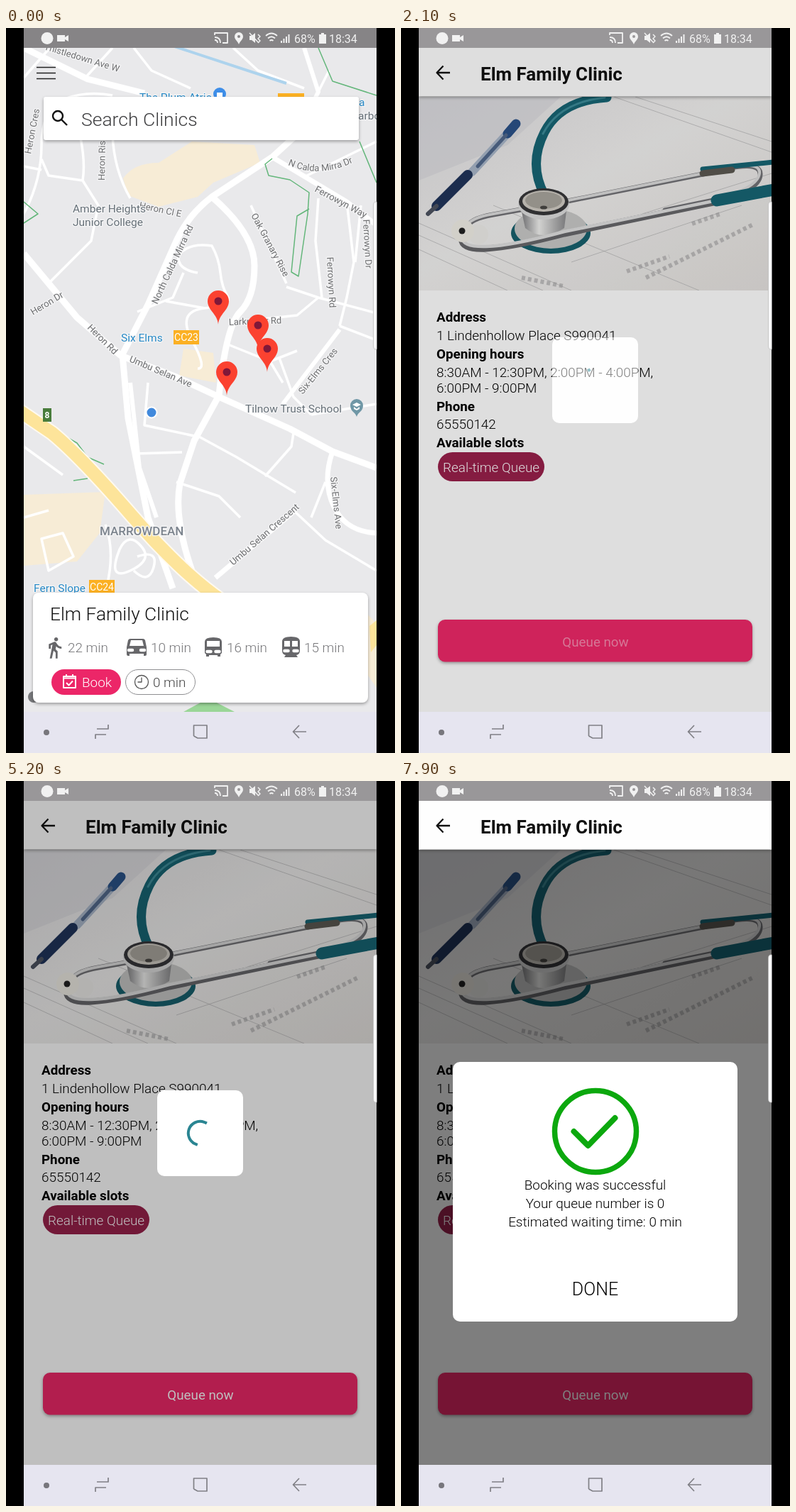
Recreate the animation shown at these times as an HTML page. Size 548 by 1022 pixels, loop 8 s.

```html
<!DOCTYPE html>
<html lang="en">
<head>
<meta charset="utf-8">
<title>Clinic queue</title>
<style>
html, body { margin: 0; width: 548px; height: 1022px; overflow: hidden; background: #000; }
svg { display: block; font-family: Roboto, sans-serif; }
.line { fill: none; stroke-linejoin: round; }
.light { font-weight: 300; }
.body { font-size: 18.9px; font-weight: 300; }
.bold { font-size: 18.8px; font-weight: 700; }
.mid { text-anchor: middle; }
.street { font-size: 13px; fill: #6d6e70; stroke: #f5f5f6; stroke-width: 2.5px; paint-order: stroke; }
.place { font-size: 15.5px; stroke: #f5f5f6; stroke-width: 2.5px; paint-order: stroke; }
.shadow { filter: drop-shadow(0 2px 2px #0005); }
</style>
</head>
<body>
<svg width="548" height="1022" viewBox="0 0 548 1022">
<defs>
  <linearGradient id="paper" x2="1" y2="1">
    <stop stop-color="#e2e1e3"/><stop offset=".45" stop-color="#f1f0ef"/><stop offset="1" stop-color="#e4e1de"/>
  </linearGradient>
  <linearGradient id="metal">
    <stop stop-color="#77777a"/><stop offset=".4" stop-color="#f0f0ee"/><stop offset="1" stop-color="#88888a"/>
  </linearGradient>
  <g id="pin">
    <path d="M0 33C-1 18-15 13-15 0A15 15 0 0 1 15 0C15 13 1 18 0 33Z" fill="#fb4230"/>
    <circle r="5.5" fill="#801839"/>
  </g>
  <path id="bend" d="M397 193Q442 213 492 188"/>
</defs>
<svg x="25" width="497" height="1022" viewBox="25 0 497 1022">

<g id="map">
  <path d="M25 0H522V964H25Z" fill="#e9e9eb"/>
  <g fill="#f7ecd6">
    <path d="M165 212Q180 190 215 190L262 160 350 165 358 190 292 218 270 238 215 252 172 236Z"/>
    <path d="M25 658 140 654 132 712 100 752 25 758Z"/>
    <path d="M250 452 292 458 296 500 244 490Z"/>
    <path d="M508 825 522 840V930L508 910Z"/>
  </g>
  <path d="M250 964 285 945 322 964Z" fill="#9ad697"/>
  <g class="line" stroke="#fff" stroke-width="3.5">
    <path d="M25 262Q50 215 50 165T82 100Q115 88 150 95M105 155Q112 190 108 215L60 208 50 185M25 195 50 200M150 150Q152 200 175 240M108 215 130 250 120 300 60 360"/>
    <path d="M270 345Q240 340 243 320 258 302 290 307 300 325 302 345T312 378 280 395 262 440 270 480M185 400 235 380 250 345M225 385 280 395"/>
    <path d="M345 412 410 405 440 380M350 430 372 470 390 500M385 465 405 520 430 545M310 445 372 470 410 455"/>
    <path d="M395 365 440 380 522 402M480 245 490 330 480 380 470 420M440 240 436 300 445 380M500 250 492 330M345 250 395 360"/>
    <path d="M270 575 325 605 408 655M365 632 402 590 406 565M183 600 248 598M200 500 195 560 265 575M240 640 300 660 330 690"/>
    <path d="M450 640 430 690M405 680 450 722 522 765M25 590 80 630M50 720 80 712 95 745 60 765ZM25 690 60 680M140 700Q155 740 140 795"/>
    <path d="M160 735Q172 710 190 730T175 765 160 735M185 745Q215 735 208 760T180 765M470 420 522 440M430 545 522 530"/>
    <path d="M180 28 205 60 260 85M320 28 355 60 420 85M455 60 435 100M420 210 522 160M60 30 25 70M150 28 110 72"/>
  </g>
  <g class="line" stroke="#fff" stroke-width="9">
    <path d="M25 318 60 360 100 408 162 462 240 492 300 520 400 565 460 597 522 620"/>
    <path d="M410 150 375 182 290 238Q258 262 240 300L200 390 164 460 172 550 200 690 235 790"/>
    <path d="M25 28 115 72 195 92M290 238Q350 290 350 335T330 400 300 518L265 582 245 642Q236 690 262 765"/>
    <path d="M375 182 425 212 480 245 522 278M460 597Q445 640 462 675T522 712M295 775 405 682" stroke-width="7"/>
    <path d="M470 425 390 530M410 150 440 90 420 28" stroke-width="6"/>
    <path d="M175 500 188 620 212 690" stroke-width="6"/>
  </g>
  <path class="line" d="M210 17 395 78" stroke="#add3ed" stroke-width="4"/>
  <g class="line" stroke="#63b67a" stroke-width="1.5">
    <path d="M375 184 365 192 370 208 400 214 427 232 425 262 412 350 402 344 410 265 427 255M440 28 460 75 522 95M498 160 522 218M25 275 45 262 25 245M65 565 100 585 115 605 138 615M95 638 115 635"/>
  </g>
  <path class="line" d="M15 537 65 571Q105 604 176 686T305 808" stroke="#fffaf0" stroke-width="22"/>
  <path class="line" d="M15 537 65 571Q105 604 176 686T305 808" stroke="#fde49a" stroke-width="18"/>
  <path d="M512 843 522 835V870L514 880Z" fill="#fde49a"/>

  <g id="streets" class="street"></g>
  <text class="street"><textPath href="#bend">N Calda Mirra Dr</textPath></text>
  <g class="place" fill="#667078">
    <text x="94" y="260">Amber Heights</text><text x="94" y="279">Junior College</text>
    <text x="337" y="542">Tilnow Trust School</text>
    <text x="132" y="715" style="font-size:17px;font-weight:500" fill="#7b838d">MARROWDEAN</text>
    <text x="496" y="129">arbor</text>
  </g>
  <g class="place" fill="#2688c5">
    <text x="162" y="442">Six Elms</text><text x="39" y="795">Fern Slope</text>
    <text x="188" y="103">The Plum Atrio</text><text x="497" y="110">a</text>
  </g>
  <path d="M236 426h36v20h-36ZM117 778h36v20h-36ZM383 92h37v10h-37Z" fill="#fbb023"/>
  <g fill="#fff" font-size="14" class="mid"><text x="254" y="441">CC23</text><text x="135" y="793">CC24</text></g>
  <path d="M52 536h12v19H52Z" fill="#487c3b"/><text x="58" y="550" font-size="12" font-weight="700" fill="#fff" class="mid">8</text>
  <circle cx="301" cy="93" r="9" fill="#3e8ee8"/><path d="M297 91h8v7h-8Z" fill="#fff"/>
  <path d="M494 548C492 541 485 541 485 532A9 9 0 0 1 503 532C503 541 496 541 494 548Z" fill="#6f97a6"/>
  <path d="M488 531 494 528 500 531 494 534ZM490 534 494 537 498 534V537L494 539 490 537Z" fill="#fff"/>
  <circle cx="205" cy="542" r="7.5" fill="#4189dc" stroke="#fff" stroke-width="2"/>
  <use href="#pin" x="299" y="385"/><use href="#pin" x="355" y="419"/><use href="#pin" x="368" y="452"/><use href="#pin" x="311" y="485"/>
  <circle cx="39" cy="943" r="8" fill="#77787b"/>

  <path d="M43 55.5H70M43 63.5H70M43 71.5H70" stroke="#222" stroke-width="1.6"/>
  <rect class="shadow" x="53" y="97" width="444" height="61" rx="3" fill="#fff"/>
  <g class="line" stroke="#111" stroke-width="2.4"><circle cx="73" cy="124" r="7"/><path d="M78 129 86 137"/></g>
  <text class="light" x="106" y="137.500" font-size="26.500" fill="#3d3d3f">Search Clinics</text>

  <rect class="shadow" x="38" y="796" width="472" height="155" rx="8" fill="#fff"/>
  <text class="light" x="62" y="835" font-size="26.300" fill="#111">Elm Family Clinic</text>
  <g fill="#67676a">
    <path transform="translate(52 857) scale(1.38)" d="M13.5 5.5c1.1 0 2-.9 2-2s-.9-2-2-2-2 .9-2 2 .9 2 2 2zM9.8 8.9L7 23h2.1l1.8-8 2.1 2v6h2v-7.5l-2.1-2 .6-3C14.8 12 16.8 13 19 13v-2c-1.9 0-3.5-1-4.3-2.4l-1-1.6c-.4-.6-1-1-1.7-1-.3 0-.5.1-.8.1L6 8.3V13h2V9.6z"/>
    <path fill-rule="evenodd" d="M175 861H193Q195 861 196 863L198 873V883Q198 885 196 885H194V882H174V885H172Q170 885 170 883V873L172 863Q173 861 175 861ZM176 863 174 871H194L192 863Z"/>
    <path fill-rule="evenodd" d="M280 865Q280 859 292 859T304 865V881L302 883V886H298V884H286V886H282V883L280 881ZM283 864V872H301V864Z"/>
    <path fill-rule="evenodd" d="M389 865Q389 858 401.500 858T414 865V878Q414 883 409 884L411 887H392L394 884Q389 883 389 878ZM392 864V872H400V864ZM403 864V872H411V864Z"/>
  </g>
  <path d="M173 877h5M190 877h5M283.500 879h5M295.500 879h5M392.500 878h5M405.500 878h5" stroke="#fff" stroke-width="4.5" stroke-linecap="round"/>
  <g class="body" fill="#77777a"><text x="87" y="880">22 min</text><text x="204" y="880">10 min</text><text x="311" y="880">16 min</text><text x="420" y="880">15 min</text></g>
  <rect x="64" y="904" width="98" height="36" rx="18" fill="#ec2668"/>
  <g class="line" stroke="#fff" stroke-width="2"><path d="M81 914H98V930H81ZM81 916.500H98M85 911V915M94 911V915M85 923 88.500 926.500 94 920.500"/></g>
  <text class="body" x="107" y="929" fill="#fff">Book</text>
  <rect x="168.500" y="904.500" width="98" height="35" rx="17.500" fill="#fff" stroke="#8f8f92"/>
  <g class="line" stroke="#555" stroke-width="1.3"><circle cx="191" cy="922" r="9.500"/><path d="M191 915.500V922H185.500"/></g>
  <text class="body" x="207" y="929" fill="#444">0 min</text>
  <path d="M25 0H522V28H25Z" fill="#868486"/>
</g>

<g id="detail">
  <path d="M25 0H522V964H25Z" fill="#fefefe"/>
  <svg x="25" y="97" width="497" height="273" viewBox="25 97 497 273">
    <path d="M25 97H522V370H25Z" fill="url(#paper)"/>
    <path d="M25 97H225L150 165 25 215Z" fill="#d8d8dc" opacity=".6"/>
    <path class="line" d="M25 275 240 370M25 292 200 370M25 312 150 370M130 250 420 370M300 97 522 175M330 97 522 160M340 262 522 205M240 330 480 250" stroke="#a9a8aa" stroke-width="1" opacity=".6"/>
    <path d="M345 352 498 276M318 343 378 322M410 276 450 262M170 352 230 364" stroke="#9c9b9d" stroke-width="6" stroke-dasharray="5 4" opacity=".55"/>
    <g class="line" stroke-linecap="round">
      <path d="M160 138 100 203" stroke="#a9b6c9" stroke-width="12"/>
      <path d="M162 135 150 149" stroke="#2b5288" stroke-width="13"/>
      <path d="M148 151 108 195" stroke="#52698c" stroke-width="5"/>
      <path d="M94 207 50 251" stroke="#20345a" stroke-width="14"/>
      <path d="M50 251 38 262" stroke="#4d5360" stroke-width="6"/>
      <path d="M290 98Q225 102 202 147T202 235" stroke="#176574" stroke-width="13"/>
      <path d="M287 98Q223 105 200 149" stroke="#3d8b98" stroke-width="3"/>
    </g>
    <ellipse cx="211" cy="289" rx="56" ry="29" fill="#17606d"/>
    <ellipse cx="211" cy="283" rx="51" ry="28" fill="#c8c8c7"/>
    <path d="M168 250H234L230 282Q200 302 175 282Z" fill="url(#metal)"/>
    <g class="line" stroke-linecap="round">
      <path d="M92 283Q95 269 130 263L230 245 430 205Q508 183 506 207T440 243L372 257" stroke="#737377" stroke-width="7"/>
      <path d="M92 281Q95 268 130 262L230 244 430 204Q508 183 505 205T440 241" stroke="#dcdcdc" stroke-width="4"/>
      <path d="M86 294Q82 313 120 311T230 290L440 246" stroke="#67676b" stroke-width="9"/>
      <path d="M87 294Q84 309 120 308T230 287L440 244" stroke="#dfdfdf" stroke-width="4.500"/>
      <path d="M445 243 525 228" stroke="#176574" stroke-width="17"/>
      <path d="M425 199 525 189" stroke="#176574" stroke-width="7"/>
      <path d="M425 205 466 200" stroke="#5c5952" stroke-width="9"/>
    </g>
    <ellipse cx="201" cy="249" rx="36" ry="21" fill="#ddd"/>
    <ellipse cx="201" cy="245" rx="35" ry="19" fill="#37373a"/>
    <ellipse cx="201" cy="244" rx="30" ry="15" fill="#d0ccc4"/>
    <ellipse cx="201" cy="243" rx="26" ry="12" fill="#a9a59d"/>
    <ellipse cx="201" cy="253" rx="5" ry="2.500" fill="#4a4845"/>
    <circle cx="109" cy="291" r="14" fill="#eeedea"/><circle cx="87" cy="286" r="16" fill="#f1eee6"/><circle cx="86" cy="286" r="4.500" fill="#222"/>
  </svg>
  <text x="50" y="414" class="bold">Address</text><text x="50" y="440" class="body">1 Lindenhollow Place S990041</text>
  <text x="50" y="466" class="bold">Opening hours</text>
  <text x="50" y="492" class="body">8:30AM - 12:30PM, 2:00PM - 4:00PM,</text><text x="50" y="514" class="body">6:00PM - 9:00PM</text>
  <text x="50" y="540" class="bold">Phone</text><text x="50" y="565" class="body">65550142</text>
  <text x="50" y="591" class="bold">Available slots</text>
  <rect x="52" y="598" width="150" height="41" rx="20.500" fill="#98214b"/>
  <text x="59" y="626" class="body" fill="#fff">Real-time Queue</text>
  <rect class="shadow" x="52" y="834" width="443" height="59.500" rx="10" fill="#ed2868"/>
  <text id="queue" x="274" y="872" font-size="18.800" class="mid" fill="#fff">Queue now</text>

  <path id="dim" d="M25 97H522V964H25Z" opacity="0"/>
  <g id="dialog">
    <rect x="-200.500" y="-183" width="401" height="366" rx="10" fill="#fff"/>
    <g class="line" stroke="#0ca80e" stroke-linecap="round">
      <circle cx=".5" cy="-85" r="57.500" stroke-width="7.500"/>
      <path d="M-30-85-10-65 28-104" stroke-width="8"/>
    </g>
    <g class="body mid"><text y="-3">Booking was successful</text><text y="23">Your queue number is 0</text><text y="49">Estimated waiting time: 0 min</text></g>
    <text y="146" font-size="25" class="light mid">DONE</text>
  </g>
  <path class="shadow" d="M25 28H522V96H25Z" fill="#fefefe"/>
  <path class="line" d="M69 63H51M59.500 53.500 50.500 63 59.500 72.500" stroke="#111" stroke-width="2.300"/>
  <text x="112" y="73.500" font-size="26" font-weight="700" fill="#111">Elm Family Clinic</text>
  <path d="M25 0H522V28H25Z" fill="#999799"/>
</g>

<g id="loader">
  <path d="M25 28H522V964H25Z" opacity=".25"/>
  <rect x="213" y="436" width="121" height="121" rx="10" fill="#fff"/>
  <circle id="arc" class="line" r="16.700" pathLength="360" stroke="#2a8592" stroke-width="4" stroke-linecap="square"/>
</g>

<g fill="#f1f1f1" font-size="16">
  <circle cx="58" cy="14.500" r="8.500"/>
  <path d="M72 10H83V13L88 10V19L83 16V19H72Z"/>
  <g class="line" stroke="#f1f1f1" stroke-width="1.800">
    <path d="M294 10V7H312V21H305M294 13Q302 13 302 21M294 17Q298 17 298 21"/>
    <path d="M355 9 358 12 355 15 358 18 355 21M343 7 356 21" stroke-width="1.500"/>
    <path d="M366 11Q374 4 382 11M369 14.500Q374 10 379 14.500M371.500 18Q374 16 376.500 18"/>
    <path d="M388 21V18M391.500 21V15M395 21V12M398.500 21V9" stroke-width="2"/>
  </g>
  <path fill-rule="evenodd" d="M328 23C326 18 322 16 322 12A6 6 0 0 1 334 12C334 16 330 18 328 23ZM326 12A2 2 0 0 0 330 12 2 2 0 0 0 326 12Z"/>
  <path d="M343 11H346L351 7V21L346 17H343ZM441 9H444V7H448V9H451V22H441Z"/>
  <text x="406" y="21">68%</text><text x="455" y="21">18:34</text>
</g>
<path d="M25 964H522V1022H25Z" fill="#e6e5f0"/>
<circle cx="57" cy="993" r="4" fill="#77767c"/>
<g class="line" stroke="#808086" stroke-width="1.700">
  <path d="M128 988H144V982M141 996H126V1002M264.500 998V983H283V1001H270L264.500 998M423 992H405M413 983 404.500 992 413 1001"/>
</g>
</svg>
<path d="M524 245H521Q517.500 245 517.500 250V448Q517.500 453 521 453H524Z" fill="#fbfbfc" stroke="#bbb" stroke-width=".8"/>
<path d="M522.500 240H548V460H522.500Z"/>
</svg>

<script>
const $ = id => document.getElementById(id);

// text, x, y, angle
$('streets').innerHTML = [
  ['Thistledown Ave W', 53, 30, 17], ['Heron Cres', 35, 178, -79], ['Heron Rise', 139, 215, -89],
  ['Heron Cl E', 187, 254, 12], ['Heron Dr', 38, 405, -31], ['Heron Rd', 114, 423, 45],
  ['North Calda Mirra Rd', 213, 390, -65], ['Ferrowyn Way', 434, 230, 28], ['Ferrowyn Dr', 503, 270, 87],
  ['Ferrowyn Rd', 452, 323, 87], ['Oak Granary Rise', 345, 264, 62], ['Umbu Selan Ave', 173, 470, 23],
  ['Larkmoor Rd', 314, 419, -2], ['Six-Elms Cres', 418, 517, -51], ['Six-Elms Ave', 457, 633, 84],
  ['Umbu Selan Crescent', 320, 758, -41]
].map(([s, x, y, a]) => `<text transform="translate(${x} ${y}) rotate(${a})">${s}</text>`).join('');

const ramp = (t, a, b) => Math.min(1, Math.max(0, (t - a) / (b - a)));
const inOut = p => p < .5 ? 4 * p ** 3 : 1 - 4 * (1 - p) ** 3;

// cubic-bezier(.4, 0, .2, 1)
function ease(x) {
  let lo = 0, hi = 1;
  for (let i = 0; i < 20; i++) {
    const u = (lo + hi) / 2, v = 1 - u;
    if (1.2 * v * v * u + .6 * v * u * u + u ** 3 < x) lo = u; else hi = u;
  }
  return lo * lo * (3 - 2 * lo);
}

function spin(t) {
  const c = (Math.max(0, t - 2281) / 1314) % 1;
  const tail = 270 * ease(ramp(c, .5, 1)), head = 270 * ease(ramp(c, 0, .5));
  const turn = t < 3900 ? 10 + (t - 2300) * 331 / 1600 : 341 + (t - 3900) * 397 / 2600;
  $('arc').setAttribute('stroke-dasharray', `${Math.max(.1, head - tail)} 400`);
  $('arc').setAttribute('transform', `translate(273.5 496.5) rotate(${turn + 90 * c + tail - 90})`);
}

function draw() {
  const t = performance.now() % 8000;
  const enter = ramp(t, 850, 1200);
  $('detail').setAttribute('opacity', enter);
  $('detail').setAttribute('transform', `translate(0 ${80 * (1 - enter) ** 3})`);
  $('queue').setAttribute('opacity', 1 - .55 * (ramp(t, 2000, 2100) - ramp(t, 2400, 2600)));
  $('loader').setAttribute('opacity', ramp(t, 2000, 2200) - ramp(t, 7400, 7600));
  spin(t);
  const open = ramp(t, 7500, 7900);
  $('dim').setAttribute('opacity', .5 * open);
  $('dialog').setAttribute('transform', `translate(273.5 579) scale(${inOut(open)})`);
  requestAnimationFrame(draw);
}
draw();
</script>
</body>
</html>
```
